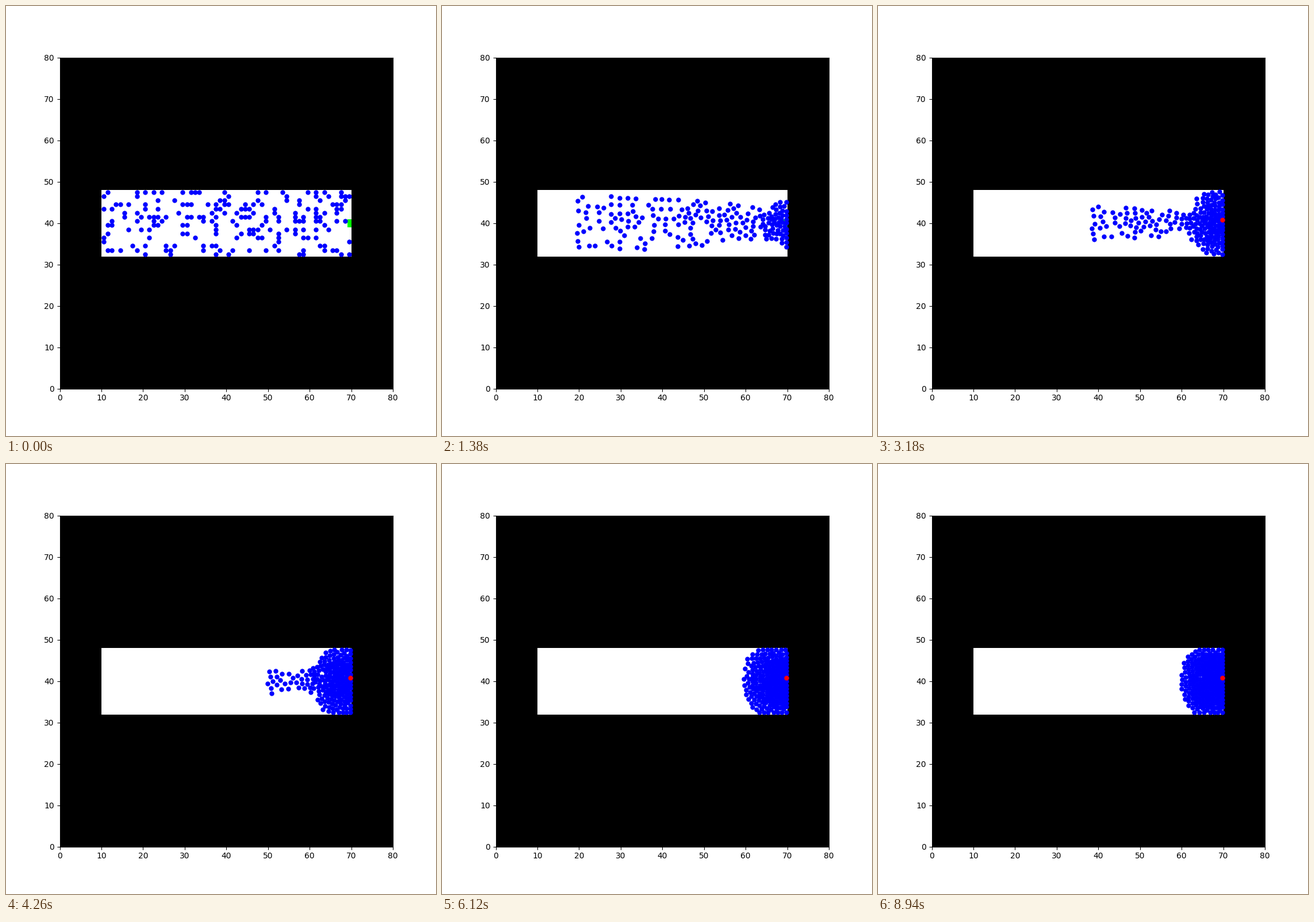
A matplotlib script for the animation above (9000 ms loop, 748 by 748 pixels).

```python
import numpy as np
import matplotlib.pyplot as plt
from matplotlib.animation import FuncAnimation

FRAMES = 150
SUBSTEPS = 10
DT = 1 / SUBSTEPS

SPEED, TAU = 0.66, 10.0            # walking speed and reaction time, in frames
PUSH, REACH, RANGE = 0.066, 1.02, 0.1
EXIT = np.array([70.0, 40.0])
LOW = np.array([10.3, 32.42])
HIGH = np.array([69.7, 47.55])
FALL_FRAME = 46
FALL_SPOT = np.array([69.7, 40.75])

# Occupied rows in each column of the rear half, starting at x = 10
REAR = [
    [46, 43, 36, 35], [47, 39, 37, 33], [43, 40, 39, 33], [44], [44, 33],
    [42, 41], [44, 38], [34], [47, 46, 42, 40, 33], [41, 38],
    [47, 44, 43, 34, 32], [41, 38, 36], [47, 41, 40, 39], [45, 43, 41, 39],
    [47, 40], [41, 34, 33], [33, 32], [45, 34], [42], [47, 44, 39, 37],
    [44, 41, 39, 37], [47, 44, 41], [47, 36], [47, 41], [41, 40, 34, 33],
    [44], [42, 40, 34], [44, 43, 41, 39, 38, 37, 34, 32], [45, 43, 33],
    [47, 45, 44, 42], [46, 44, 32],
]
FRONT_COUNT = 100


def start_positions():
    rear = [(10 + i, row) for i, rows in enumerate(REAR) for row in rows]
    cells = [(x, y) for x in range(41, 70) for y in range(32, 48)
             if not (x == 69 and 38 <= y <= 41)]
    rng = np.random.default_rng(12)
    picks = rng.choice(len(cells), FRONT_COUNT, replace=False)
    return np.array(rear + [cells[i] for i in picks]) + 0.5


def acceleration(pos, vel):
    to_exit = EXIT - pos
    dist = np.hypot(to_exit[:, 0], to_exit[:, 1])
    wish = SPEED * to_exit / np.maximum(dist, 0.6)[:, None]

    dx = pos[:, None, 0] - pos[None, :, 0]
    dy = pos[:, None, 1] - pos[None, :, 1]
    gap = np.sqrt(dx * dx + dy * dy) + 1e-6
    force = PUSH * np.exp(np.minimum((REACH - gap) / RANGE, 4.0)) / gap
    np.fill_diagonal(force, 0)
    push = np.column_stack([(force * dx).sum(1), (force * dy).sum(1)])
    return (wish - vel) / TAU + push


def simulate():
    pos = start_positions()
    vel = np.zeros_like(pos)
    path = [pos.copy()]
    fallen = None
    for frame in range(1, FRAMES):
        if frame == FALL_FRAME:
            fallen = np.argmin(((pos - FALL_SPOT) ** 2).sum(1))
        for _ in range(SUBSTEPS):
            vel += acceleration(pos, vel) * DT
            pos = pos + vel * DT
            vel[(pos < LOW) | (pos > HIGH)] = 0
            pos = np.clip(pos, LOW, HIGH)
            if fallen is not None:
                pos[fallen] = FALL_SPOT
                vel[fallen] = 0
        path.append(pos.copy())
    return np.array(path), fallen


path, fallen = simulate()

fig, ax = plt.subplots(figsize=(7.48, 7.48), dpi=100)
room = np.zeros((80, 80, 3), dtype=np.uint8)
room[32:48, 10:70] = 255
room[39:41, 69] = (0, 255, 0)
ax.imshow(room, origin="lower", extent=(0, 80, 0, 80), aspect="auto",
          interpolation="nearest")
ax.set_xticks(range(0, 81, 10))
ax.set_yticks(range(0, 81, 10))

crowd, = ax.plot([], [], "bo", markersize=5)
casualty, = ax.plot([], [], "ro", markersize=5)


def update(frame):
    crowd.set_data(path[frame, :, 0], path[frame, :, 1])
    if frame >= FALL_FRAME:
        casualty.set_data(path[frame, [fallen], 0], path[frame, [fallen], 1])
    else:
        casualty.set_data([], [])
    return crowd, casualty


anim = FuncAnimation(fig, update, frames=FRAMES, interval=60,
                     repeat=True, repeat_delay=0)
plt.show()
```
